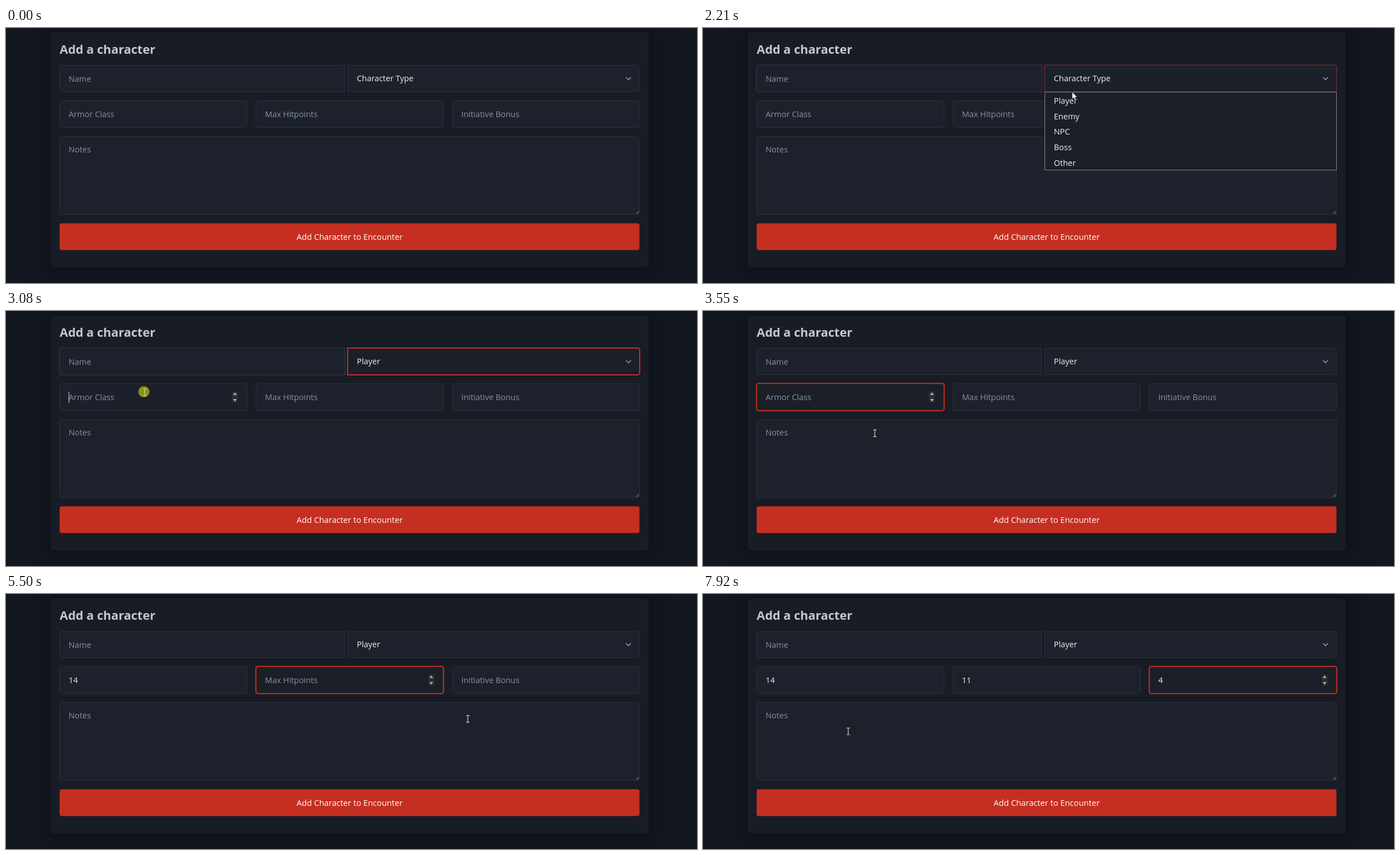
Animation, 1230 px wide and 455 px high, one loop 8000 ms. Source, as an HTML page:

```html
<!DOCTYPE html>
<html lang="en">
<head>
<meta charset="utf-8">
<title>Add a character</title>
<style>
html, body { margin: 0; width: 100%; height: 100%; overflow: hidden; background: #13171f; }
.card {
  position: absolute; left: 80px; top: 8px; width: 1064px; height: 419px;
  border-radius: 5px; background: #181c25;
  box-shadow: 8px 16px 96px rgba(7,9,12,.06), 3px 7px 40px rgba(7,9,12,.045),
    2px 4px 22px rgba(7,9,12,.036), 1px 2px 12px rgba(7,9,12,.03);
}
svg { position: absolute; left: 0; top: 0; width: 1230px; height: 455px; }
text { font: 14.4px "Open Sans", "Noto Sans", sans-serif; fill: #eef0f3; }
.title { font-size: 21.6px; font-weight: 700; fill: #c2c7d0; }
.hint { fill: #8891a4; }
.button { font-size: 14.6px; fill: #fff; text-anchor: middle; }
.field { fill: #1c212c; stroke: #2a3140; }
.ring { fill: #1a1f28; stroke: #c52f21; stroke-width: 2; opacity: 0; }
.glow { fill: none; stroke: #272e3b; stroke-width: 2; }
</style>
</head>
<body>
<div class="card"></div>
<svg viewBox="0 0 1230 455">
  <text class="title" x="95.5" y="46">Add a character</text>

  <path class="field" d="M602.5 66.5V113.5H99.5a4 4 0 0 1-4-4V70.5a4 4 0 0 1 4-4z"/>
  <path id="glow" class="glow" d="M603 66V114H99a4 4 0 0 1-4-4V70a4 4 0 0 1 4-4z"/>
  <text class="hint" x="111.5" y="96">Name</text>

  <path class="field" d="M608.5 66.5V113.5H1123.5a4 4 0 0 0 4-4V70.5a4 4 0 0 0-4-4z"/>
  <path id="typeRing" class="ring" d="M608 66V114H1124a4 4 0 0 0 4-4V70a4 4 0 0 0-4-4z"/>
  <text id="type" x="624.5" y="95">Character Type</text>
  <path d="M1103.5 88l4.5 4.3 4.5-4.3" fill="none" stroke="#a4acba" stroke-width="1.2"/>

  <g id="numbers"></g>

  <rect class="field" x="95.5" y="193.5" width="1032" height="139" rx="4"/>
  <text class="hint" x="111.5" y="222">Notes</text>
  <path d="M1121.5 331.5l5-5M1124.5 331.5l2-2" stroke="#8c8f96"/>

  <rect x="95.4" y="348.4" width="1032.2" height="47.8" rx="4" fill="#c52f21"/>
  <text class="button" x="611.7" y="377.5">Add Character to Encounter</text>

  <g id="list">
    <rect x="608.5" y="114.5" width="519" height="139" fill="#1a1f28" stroke="#858585"/>
  </g>

  <g id="mouse">
    <circle id="halo" cx="-1.5" cy="-1" r="10" fill="#ff0" fill-opacity=".5"/>
    <path id="arrow" d="M0 0V13L3 10.3 5 15 7.4 14 5.4 9.5H9.3z" fill="#fff" stroke="#111" stroke-width=".8"/>
    <path id="beam" d="M-3-6H3M-3 6H3M0-6V6" fill="none" stroke="#d4d5d6" stroke-width="1.2"/>
  </g>
</svg>
<script>
const LOOP = 8000, BLINK = 530, DELAY = 70, FADE = 200, DIGIT = 8.2;
const OPEN = 2080, PICK = 2400;
const $ = id => document.getElementById(id);
const show = (id, on) => $(id).setAttribute('visibility', on ? 'visible' : 'hidden');
const clamp = v => Math.min(1, Math.max(0, v));
const within = (t, from, to) => t >= from && t < to;

// Number fields: clicked, then one digit of the value per key time, then left.
const numbers = [
  { id: 'armor', hint: 'Armor Class', value: '14', click: 3010, keys: [3750, 4020], leave: 4640 },
  { id: 'points', hint: 'Max Hitpoints', value: '11', click: 4640, keys: [5700, 6240], leave: 6580 },
  { id: 'bonus', hint: 'Initiative Bonus', value: '4', click: 6580, keys: [7000], leave: Infinity }
];
const clicks = [OPEN, PICK, ...numbers.map(f => f.click)];

// Pointer stops: time, x, y
const stops = [
  [130, 598, 0], [860, 240, 118], [1200, 231, 90], [1500, 320, 182], [1870, 665, 100],
  [2210, 657, 114], [2500, 655, 130], [3010, 247, 145], [3300, 247, 145], [3690, 330, 248],
  [4490, 539, 157], [4750, 539, 157], [5400, 820, 223], [6100, 857, 220], [6440, 848, 155],
  [6600, 848, 155], [6840, 845, 186], [7380, 283, 251], [7920, 258.5, 245]
];

['Player', 'Enemy', 'NPC', 'Boss', 'Other'].forEach((name, i) => {
  $('list').innerHTML += `<text x="624.5" y="${135 + i * 27.7}">${name}</text>`;
});

numbers.forEach((f, i) => {
  f.x = 95 + i * 349.5;
  f.left = f.x + 16.5;
  $('numbers').innerHTML += `
    <rect class="field" x="${f.x + .5}" y="129.5" width="333.5" height="48" rx="4"/>
    <rect id="${f.id}Ring" class="ring" x="${f.x + .3}" y="129.3" width="334" height="48.4" rx="4"/>
    <text id="${f.id}" x="${f.left}" y="159"></text>
    <rect id="${f.id}Caret" y="144" width="1" height="20" fill="#e0e3e7"/>
    <g id="${f.id}Spin" transform="translate(${f.x + 312.5} 153.5)">
      <rect x="-5.5" y="-10" width="11" height="20" rx="2" fill="#2b2b2b"/>
      <path d="M-3.5-3.5L0-8.5 3.5-3.5zM-3.5 3.5L0 8.5 3.5 3.5z" fill="#a8a8a8"/>
    </g>`;
});

function pointer(t) {
  const next = stops.findIndex(s => s[0] > t);
  if (next < 1) return stops[next ? stops.length - 1 : 0].slice(1);
  const [t0, x0, y0] = stops[next - 1], [t1, x1, y1] = stops[next];
  const p = (t - t0) / (t1 - t0), k = p * p * (3 - 2 * p);
  return [x0 + (x1 - x0) * k, y0 + (y1 - y0) * k];
}

function ring(id, t, click, leave) {
  const ramp = start => clamp((t - start - DELAY) / FADE);
  $(id + 'Ring').style.opacity = ramp(click) * (1 - ramp(leave));
}

function drawNumber(f, t, x, inRow) {
  const count = f.keys.filter(k => t >= k).length;
  const focused = within(t, f.click, f.leave);
  const since = t - (count ? f.keys[count - 1] : f.click);
  const text = $(f.id);
  text.textContent = count ? f.value.slice(0, count) : f.hint;
  text.setAttribute('class', count ? '' : 'hint');
  $(f.id + 'Caret').setAttribute('x', f.left + count * DIGIT);
  show(f.id + 'Caret', focused && since % (2 * BLINK) < BLINK);
  show(f.id + 'Spin', focused || inRow && within(x, f.x, f.x + 334));
  ring(f.id, t, f.click, f.leave);
}

function draw(t) {
  const [x, y] = pointer(t);
  const open = within(t, OPEN + DELAY, PICK + DELAY);
  const inRow = !open && within(y, 129, 178);
  const inNumber = inRow && numbers.some(f => within(x, f.x, f.x + 334));
  const inName = within(x, 95, 603) && within(y, 66, 114);
  const inNotes = !open && within(x, 95, 1128) && within(y, 193, 333);
  const beam = inNumber || inName || inNotes;

  numbers.forEach(f => drawNumber(f, t, x, inRow));
  ring('type', t, OPEN, numbers[0].click);
  $('type').textContent = t < PICK + DELAY ? 'Character Type' : 'Player';
  show('list', open);
  show('glow', within(t, 1000, 3400));

  const shown = t >= stops[0][0];
  $('mouse').setAttribute('transform', `translate(${x} ${y})`);
  show('halo', clicks.some(c => within(t, c, c + 125)));
  show('arrow', shown && !beam);
  show('beam', shown && beam);
}

function tick() {
  draw(performance.now() % LOOP);
  requestAnimationFrame(tick);
}
tick();
</script>
</body>
</html>
```
